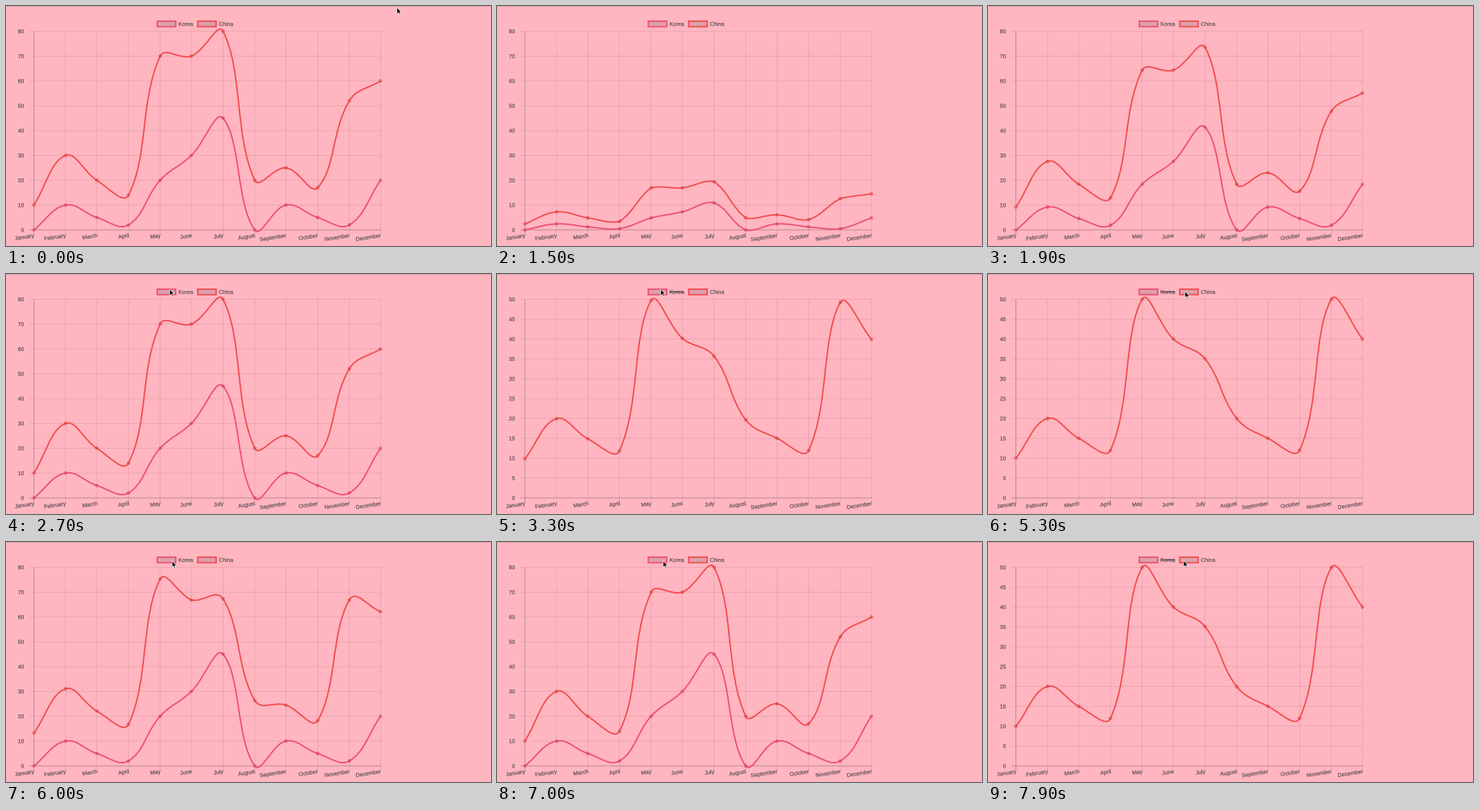
A matplotlib script for the animation above (8000 ms loop, 600x298 px).

```python
import numpy as np
import matplotlib.pyplot as plt
from matplotlib.animation import FuncAnimation
from matplotlib.patches import PathPatch, Polygon, Rectangle
from matplotlib.path import Path
from matplotlib.textpath import TextPath
from matplotlib.transforms import Affine2D

plt.rcParams["font.family"] = "Liberation Sans"

W, H, DPI = 600, 298, 100
STEP, LOOP = 100, 8000
PT = 72 / DPI                      # points per pixel
S = 0.568                          # scale of the chart on the page
FONT = 12 * S
LEFT, TOP, BOTTOM = 34.5, 31.4, 278
# Columns sit on whole units of the unscaled chart
COLUMNS = LEFT + S * np.round(68.68 * np.arange(12))
RIGHT = COLUMNS[-1]
PINK, INK = "#ffb6c1", "#574c50"
KOREA_COLOR, CHINA_COLOR = "#ee4d70", "#f24a4c"

MONTHS = ["January", "February", "March", "April", "May", "June", "July",
          "August", "September", "October", "November", "December"]
KOREA = np.array([0, 10, 5, 2, 20, 30, 45, 0, 10, 5, 2, 20])
CHINA = np.array([10, 20, 15, 12, 50, 40, 35, 20, 15, 12, 50, 40])

# Times of the clicks and of the page reload, in ms
RELOAD, KOREA_OFF, CHINA_OFF, CHINA_ON = 1433, 2760, 3900, 4600
KOREA_ON, KOREA_OFF_AGAIN = 5853, 7150

# Pointer keys: time, x, y
POINTER = np.array([
    (2500, 211.5, 39), (2600, 204.5, 23), (2700, 202.5, 18.8),
    (3300, 202.5, 18.8), (3800, 245, 21.5), (4500, 245, 21.5),
    (4700, 244, 21.5), (5550, 243.7, 21.5), (5800, 205.5, 23.5),
    (7400, 205.5, 23.5), (7900, 242, 23)])

fig = plt.figure(figsize=(W / DPI, H / DPI), dpi=DPI, facecolor=PINK)
ax = fig.add_axes([0, 0, 1, 1])
ax.set_xlim(0, W)
ax.set_ylim(H, 0)
ax.axis("off")


def rule(x0, y0, x1, y1, alpha, width=1, color="black", z=1):
    return ax.plot([x0, x1], [y0, y1], color=color, alpha=alpha, snap=False,
                   lw=width * PT, solid_capstyle="butt", zorder=z)[0]


def label(text, x, y, align=0, angle=0):
    """Text centred on y; align 0 starts at x, 1 ends at x."""
    path = TextPath((0, 0), text, size=FONT)
    width = path.get_extents().x1
    place = (Affine2D().translate(-align * width, -0.36 * FONT).scale(1, -1)
             .rotate_deg(-angle).translate(x, y))
    return ax.add_patch(PathPatch(place.transform_path(path), fc=INK, ec=INK,
                                  lw=0.15 * PT, zorder=3))


def month_axis(shift, bottom, angle):
    parts = []
    for i, (x, month) in enumerate(zip(COLUMNS + shift, MONTHS)):
        parts.append(rule(x, TOP, x, bottom + 10 * S, 0.08 if i else 0.22))
        parts.append(label(month, x + 0.3, bottom + 6.6, 1, angle))
    return parts


def value_axis(top, step):
    parts = []
    for value in range(0, top + 1, step):
        y = BOTTOM + (TOP - BOTTOM) * value / top
        parts.append(rule(LEFT - 10 * S, y, RIGHT + 1, y, 0.08 if value else 0.25))
        parts.append(label(str(value), 22, y, 1))
    return parts


def legend(x, text, color):
    """Draws one legend item and returns its strike-through."""
    ax.add_patch(Rectangle((x, 18.8), 40 * S, FONT, fc="#dca0ad", ec=color,
                           lw=3 * S * PT, snap=False, zorder=3))
    start = x + 46 * S
    end = start + TextPath((0, 0), text, size=FONT).get_extents().x1
    label(text, start, 22.2)
    return rule(start, 22.2, end, 22.2, 1, 1.1, INK, 4)


def spline(values, top):
    """Bezier vertices (start, control, control, end, ...) with tension 0.4."""
    y = BOTTOM + (TOP - BOTTOM) * np.asarray(values) / top
    pts = np.column_stack([COLUMNS, y])
    verts = []
    for i, p in enumerate(pts):
        before, after = pts[max(i - 1, 0)], pts[min(i + 1, 11)]
        d0, d1 = np.hypot(*(p - before)), np.hypot(*(after - p))
        pull = 0.4 * (after - before) / (d0 + d1)
        verts += [p - d0 * pull, p, p + d1 * pull]
    return np.array(verts[1:-1])


class Series:
    CODES = [Path.MOVETO] + [Path.CURVE4] * 33

    def __init__(self, color, z):
        self.line = ax.add_patch(PathPatch(Path([(0, 0)]), fill=False, ec=color,
                                           lw=3 * S * PT, capstyle="butt", zorder=z))
        self.dots = ax.add_patch(PathPatch(Path([(0, 0)]), fc=(0, 0, 0, 0.12),
                                           ec=color, lw=0.7 * PT, zorder=z + 0.1))

    def show(self, verts, visible):
        self.line.set_path(Path(verts, self.CODES))
        self.dots.set_path(Path.make_compound_path(
            *[Path.circle(p, 3 * S) for p in verts[::3]]))
        self.line.set_visible(visible)
        self.dots.set_visible(visible)


def ease(t, start):
    u = min(max((t - start) / 1000, 0), 1)
    return 1 - (1 - u) ** 4


def mix(a, b, k):
    return a + (b - a) * k


FLAT = spline(np.zeros(12), 80)
KOREA_LINE = spline(KOREA, 80)
STACKED = spline(KOREA + CHINA, 80)
ALONE = spline(CHINA, 50)

rule(0, 0.5, W, 0.5, 0.12)
months = month_axis(0, BOTTOM, 9)
bare = month_axis(-0.7, 274, 15) + [rule(LEFT - 1, 274.5, RIGHT + 1, 274.5, 0.12)]
by_ten, by_five = value_axis(80, 10), value_axis(50, 5)
korea_strike = legend(187.2, "Korea", KOREA_COLOR)
china_strike = legend(237.2, "China", CHINA_COLOR)
china, korea = Series(CHINA_COLOR, 5), Series(KOREA_COLOR, 6)
ARROW = np.array([(0, 0), (0, 8), (1.9, 6.3), (3.1, 9), (4.3, 8.5), (3.1, 5.8), (5.6, 5.8)])
pointer = ax.add_patch(Polygon(ARROW, fc="black", ec="white", lw=0.6 * PT, zorder=9))


def china_verts(t):
    if t < RELOAD:
        return STACKED
    if t < KOREA_OFF:
        return mix(FLAT, STACKED, ease(t, RELOAD))
    if t < KOREA_ON:
        return mix(STACKED, ALONE, ease(t, KOREA_OFF))
    if t < KOREA_OFF_AGAIN:
        return mix(ALONE, STACKED, ease(t, KOREA_ON))
    return mix(STACKED, ALONE, ease(t, KOREA_OFF_AGAIN))


def move_pointer(t):
    key_times = POINTER[:, 0]
    pointer.set_visible(t < 100 or t >= key_times[0])
    if t < 100:
        tip = (483.7, 2)
    else:
        tip = [np.interp(t, key_times, POINTER[:, k]) for k in (1, 2)]
    pointer.set_xy(ARROW + tip)


def set_visible(parts, visible):
    for part in parts:
        part.set_visible(visible)


def draw(i):
    t = i * STEP
    korea_on = t < KOREA_OFF or KOREA_ON <= t < KOREA_OFF_AGAIN
    china_on = not CHINA_OFF <= t < CHINA_ON
    any_on = korea_on or china_on

    korea_grow = ease(t, RELOAD) if t >= RELOAD else 1
    korea.show(mix(FLAT, KOREA_LINE, korea_grow), korea_on)
    china.show(china_verts(t), china_on)

    set_visible(months, any_on)
    set_visible(bare, not any_on)
    set_visible(by_ten, korea_on)
    set_visible(by_five, china_on and not korea_on)
    korea_strike.set_visible(not korea_on)
    china_strike.set_visible(not china_on)
    move_pointer(t)
    return []


anim = FuncAnimation(fig, draw, frames=LOOP // STEP, interval=STEP, repeat=True,
                     repeat_delay=0, blit=False)
plt.show()
```
